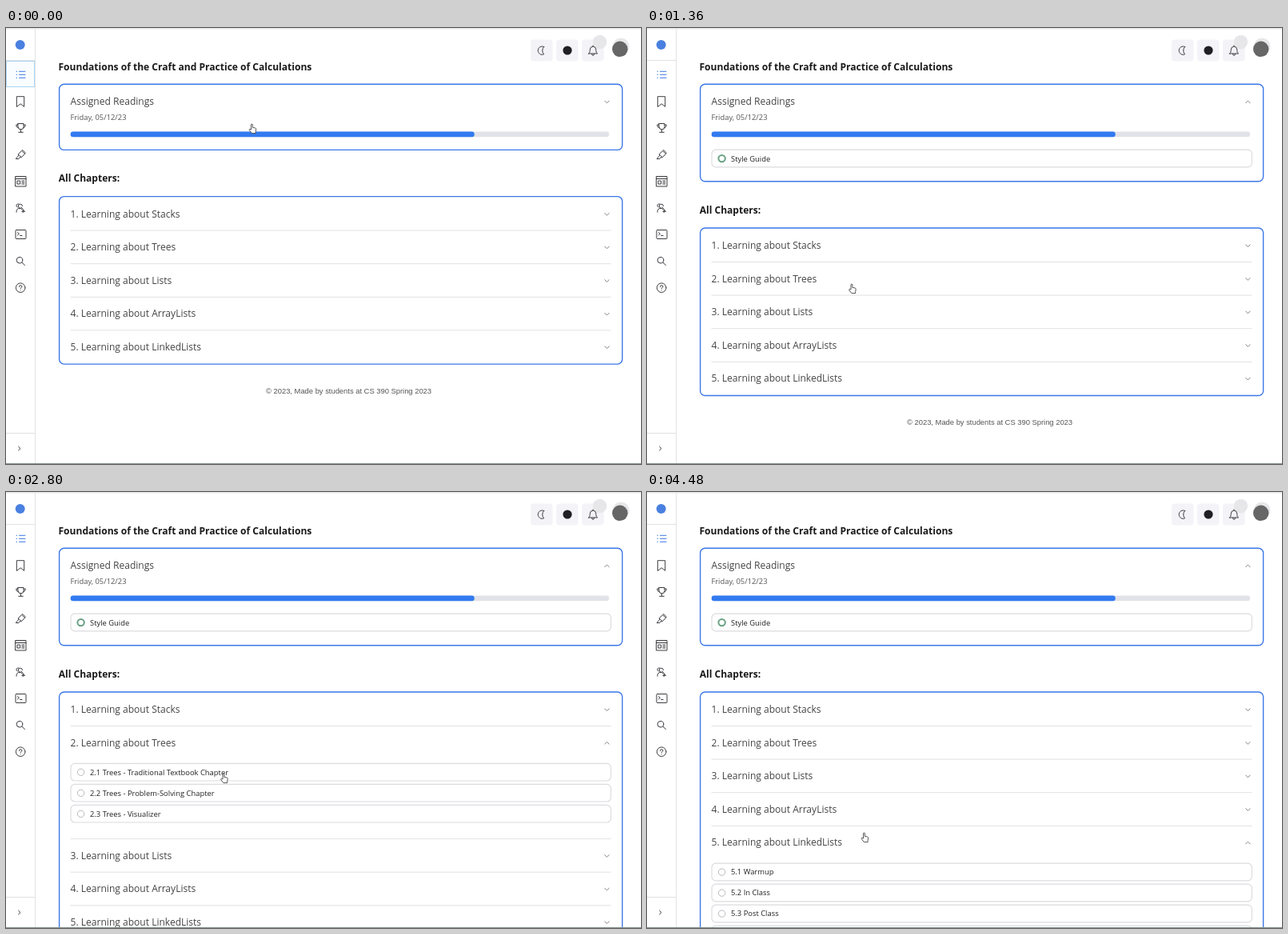
An HTML page for the animation above (4.56 s loop, 794 by 545 pixels).

```html
<!DOCTYPE html>
<html lang="en">
<head>
<meta charset="utf-8">
<title>Course chapters</title>
<style>
  html, body { margin: 0; width: 100%; height: 100%; overflow: hidden; background: #fff; }
  #stage { display: block; width: 794px; height: 545px; }
  text { font-family: "Open Sans", sans-serif; fill: #333; }
  .title { font-size: 12.06px; font-weight: 700; fill: #1a1a1a; }
  .item { font-size: 12.06px; fill: #444; }
  .date { font-size: 9.38px; fill: #555; }
  .row { font-size: 9.38px; font-weight: 500; fill: #222; }
  .foot { font: 9.38px "Liberation Sans", Arial, sans-serif; fill: #555; }
  .card { fill: #fff; stroke: #3b78e7; stroke-width: 1.4; }
  .line { stroke: #e2e2e4; stroke-width: 1; }
  .box { fill: #fff; stroke: #dcdce0; stroke-width: 1.2; }
  .box.hot { fill: #efeef3; stroke: #cfcfd3; }
  .icon { fill: none; stroke: #3c3c40; stroke-width: 1; stroke-linecap: round; stroke-linejoin: round; }
  .chev { fill: none; stroke: #808085; stroke-width: 1; stroke-linecap: round; stroke-linejoin: round; }
</style>
</head>
<body>
<svg id="stage" viewBox="0 0 794 545">
  <rect width="794" height="545" fill="#fff"/>
  <g id="main"></g>

  <!-- top buttons -->
  <g fill="#f3f3f8">
    <rect x="656" y="14.5" width="27.5" height="27" rx="4"/>
    <rect x="688" y="14.5" width="27.5" height="27" rx="4"/>
    <rect x="720" y="14.5" width="27.5" height="27" rx="4"/>
  </g>
  <path class="icon" d="M672.6 23.4a5.2 5.2 0 1 0 0 9.4a6.6 6.6 0 0 1 0-9.4z"/>
  <circle cx="702" cy="28" r="5.6" fill="#1f1f24"/>
  <circle cx="742.5" cy="17.5" r="8.7" fill="#e7e7e9"/>
  <path class="icon" d="M728.5 32h11q-1.7-1.2-1.7-3.5v-1.4q0-3.6-3.8-4.1q-3.8.5-3.8 4.1v1.4q0 2.3-1.7 3.5zM734 23v-1M732.5 32.5a1.5 1.8 0 0 0 3 0"/>
  <circle cx="769" cy="23" r="10.5" fill="#e7e7e9"/>
  <circle cx="767.7" cy="26.3" r="9.7" fill="#666"/>

  <!-- side bar -->
  <rect y="1" width="36" height="543" fill="#fff"/>
  <path class="line" d="M36.5 1V544M0 40.5H36M0 506.5H36"/>
  <rect id="focus" x=".5" y="41.5" width="35" height="32" fill="#fafdff" stroke="#a9d6f3"/>
  <circle cx="17.7" cy="21" r="6" fill="#4a80e0"/>
  <path class="icon" style="stroke:#3b78e7" d="M16.5 54.3h7.5M16.5 58.3h7.5M16.5 62.3h7.5M13 54.3h.6M13 58.3h.6M13 62.3h.6"/>
  <g class="icon">
    <path d="M13.7 85.7h9v12.6l-4.5-3.5l-4.5 3.5z"/>
    <path d="M15 119.5h7v4q0 3.4-3.5 3.4t-3.5-3.4zM15 121h-2.3q0 3.7 2.6 3.7M22 121h2.3q0 3.7-2.6 3.7M18.5 127v3M15.7 130.3h5.6"/>
    <path d="M12.5 163.3l3-3.6v-2.2l4.2-4l3.8 3.8l-4 4.2h-2.2l-1.2 1.8zM15.5 158l3.4 3.4M20 153.2l.8-.6l3.5 3.4l-.7.9"/>
    <path d="M12 185.5h13v12.5h-13zM12 188.5h13M14.3 191h3.3v4h-3.3zM19.8 191h3M19.8 193h3M19.8 195h3"/>
    <path d="M13 230.2q0-4.8 4-4.8q1.8 0 2.8 1M20.5 222.5a2.6 2.6 0 1 0-2.2 2.8M16 220a2 2 0 1 0-1.7 4M19.2 224l3.8 5.2M21.2 227.6v3M19.8 229.2h3.6"/>
    <path d="M13 252.5h11q1 0 1 1v9q0 1-1 1h-11q-1 0-1-1v-9q0-1 1-1zM14.5 255.7l2 1.6l-2 1.6M17.7 259.5h2.4"/>
    <path d="M20.8 290.2a3.8 3.8 0 1 1-7.6 0a3.8 3.8 0 1 1 7.6 0M19.8 293l3.6 3.6"/>
    <path d="M24 324.7a5.8 5.8 0 1 1-11.6 0a5.8 5.8 0 1 1 11.6 0M16.5 323.4q0-1.7 1.7-1.7t1.7 1.5q0 .9-1 1.3q-.7.3-.7 1.2M18.2 327.7v.1"/>
    <path d="M15.6 523.2l2.4 2.4l-2.4 2.4"/>
  </g>
  <rect width="794" height="1.5" fill="#e6e6e6"/>
  <rect y="544" width="794" height="1" fill="#87918f"/>
  <path id="hand" fill="#fff" stroke="#444" stroke-width=".9" stroke-linejoin="round"
    d="M-2 1V-5a.95.95 0 0 1 1.9 0V-1.6l3 .5q1.4.3 1.3 1.9L3.6 3.6V5.6H-1.2L-4.2 1.6q-.5-1 .5-1.3z"/>
</svg>
<script>
const LOOP = 4560, STEP = 80;
const PITCH = 41.6;
const main = document.getElementById('main');

function add(parent, name, attrs = {}, label) {
  const node = document.createElementNS('http://www.w3.org/2000/svg', name);
  for (const key in attrs) node.setAttribute(key, attrs[key]);
  if (label) node.textContent = label;
  parent.append(node);
  return node;
}
const write = (parent, kind, x, y, label) => add(parent, 'text', { class: kind, x, y }, label);
const move = (node, x, y) => node.setAttribute('transform', `translate(${x} ${y})`);
const chevron = parent => add(parent, 'path', { class: 'chev', d: 'M-2.7 -1.3L0 1.4L2.7 -1.3' });
const turn = (node, y, open) =>
  node.setAttribute('transform', `translate(751.4 ${y}) scale(1 ${1 - 2 * open})`);

// A clipped panel holding rounded rows
function panel(parent, top, labels, done) {
  const view = add(parent, 'svg', { x: 0, width: 794, height: 0, overflow: 'hidden' });
  const boxes = labels.map((label, i) => {
    const y = top + i * 26;
    const box = add(view, 'rect', { class: 'box', x: 81, y, width: 675.3, height: 21.6, rx: 5 });
    add(view, 'circle', {
      cx: 93.6, cy: y + 10.9, r: 4.2, fill: '#fff',
      stroke: done ? '#67a184' : '#b9b9bd', 'stroke-width': done ? 2 : 1
    });
    write(view, 'row', 105, y + 14.3, label);
    return box;
  });
  return { view, boxes };
}
function fit(view, y, height) {
  view.setAttribute('y', y);
  view.setAttribute('height', Math.max(height, 0));
  view.style.display = height > 0.1 ? '' : 'none';
}

write(main, 'title', 65.5, 52.8, 'Foundations of the Craft and Practice of Calculations');
const readCard = add(main, 'rect', { class: 'card', x: 66.6, y: 70.3, width: 704, rx: 6 });
write(main, 'item', 80.6, 96.2, 'Assigned Readings');
write(main, 'date', 80.4, 115.3, 'Friday, 05/12/23');
add(main, 'rect', { x: 80.7, y: 129.6, width: 673.3, height: 6.6, rx: 3.3, fill: '#e2e3e8' });
add(main, 'rect', { x: 80.7, y: 129.6, width: 505, height: 6.6, rx: 3.3, fill: '#327af0' });
const readChev = chevron(main);
const reading = panel(main, 6.2, ['Style Guide'], true);

const lower = add(main, 'g');
write(lower, 'title', 65.7, 192.4, 'All Chapters:');
const listCard = add(lower, 'rect', { class: 'card', x: 66.6, y: 210.6, width: 704, rx: 6 });
const foot = write(lower, 'foot', 325, 457, '© 2023, Made by students at CS 390 Spring 2023');

const rows = {
  Trees: ['2.1 Trees - Traditional Textbook Chapter', '2.2 Trees - Problem-Solving Chapter', '2.3 Trees - Visualizer'],
  LinkedLists: ['5.1 Warmup', '5.2 In Class', '5.3 Post Class', '5.4 Review']
};
const chapters = ['Stacks', 'Trees', 'Lists', 'ArrayLists', 'LinkedLists'].map((name, i) => {
  const group = add(lower, 'g');
  write(group, 'item', 80.6, 4.3, `${i + 1}. Learning about ${name}`);
  const chev = chevron(group);
  const body = rows[name] && panel(group, 5.8, rows[name]);
  const line = i < 4 && add(group, 'path', { class: 'line', d: 'M80.5 0H756.5' });
  return { group, chev, body, line };
});

// time, x, y
const path = [
  [0, 308.5, 126], [160, 308.5, 126], [640, 266, 288], [1120, 257, 326], [1520, 257, 326],
  [2000, 246.5, 389], [2240, 249, 404], [2480, 255, 395], [2800, 273, 358], [2960, 272.5, 318],
  [3120, 272.5, 318], [3400, 272.5, 432], [LOOP, 272.5, 432]
];
const ease = p => p * p * (3 - 2 * p);
const ramp = (t, from, to) => ease(Math.min(1, Math.max(0, (t - from) / (to - from))));

function pointer(t) {
  const i = path.findIndex(p => p[0] > t);
  const [t0, x0, y0] = path[i - 1], [t1, x1, y1] = path[i];
  const p = ease((t - t0) / (t1 - t0));
  return [x0 + (x1 - x0) * p, y0 + (y1 - y0) * p];
}

function draw(t) {
  const read = ramp(t, 160, 640);
  const trees = ramp(t, 1520, 1840) - ramp(t, 2960, 3240);
  const linked = ramp(t, 3440, 3720);
  const slack = t < 2160 ? 2.6 : 0;
  const heights = [0, trees * (99.5 + slack), 0, 0, linked * 125.5];
  const opens = [0, trees, 0, 0, linked];
  const shift = read * 39.4;
  const [x, y] = pointer(t);

  document.getElementById('focus').style.display = t < STEP ? '' : 'none';
  readCard.setAttribute('height', 82.1 + shift);
  turn(readChev, 92.4, read);
  fit(reading.view, 146, shift);
  move(lower, 0, shift);

  let top = 232.2;
  chapters.forEach(({ group, chev, body, line }, i) => {
    move(group, 0, top);
    turn(chev, 0.6, opens[i]);
    if (body) fit(body.view, 20.4, heights[i]);
    if (line) move(line, 0, 20.9 + heights[i]);
    top += PITCH + heights[i];
  });
  const extra = top - 232.2 - PITCH * 5;
  listCard.setAttribute('height', 209.5 + extra);
  foot.setAttribute('y', 457 + extra);

  chapters[1].body.boxes.forEach((box, i) => {
    const at = y - 5 - (339.5 + i * 26);
    box.classList.toggle('hot', t >= 1840 && t < 2720 && at >= -2 && at < 24);
  });
  move(document.getElementById('hand'), x, y);
}

const start = performance.now();
function tick(now) {
  const t = Math.max(0, now - start) % LOOP;
  draw(Math.floor(t / STEP) * STEP);
  requestAnimationFrame(tick);
}
draw(0);
requestAnimationFrame(tick);
</script>
</body>
</html>
```
